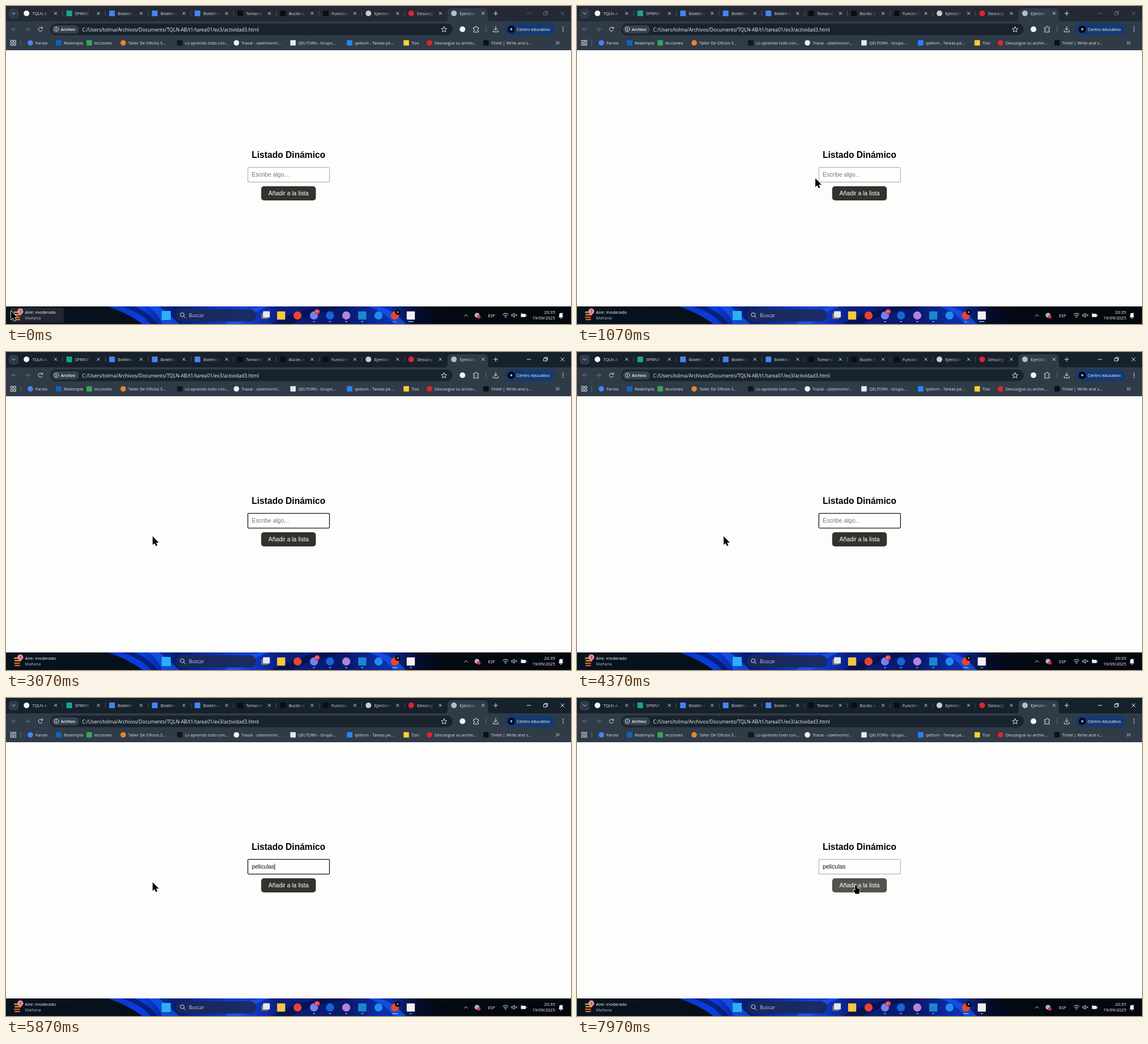
Recreate the animation shown at these times as an HTML page. Size 998 by 561 pixels, loop 8000 ms.

```html
<!DOCTYPE html>
<html lang="es">
<head>
<meta charset="utf-8">
<title>Listado Dinámico</title>
<style>
  html, body { margin: 0; width: 100%; height: 100%; overflow: hidden; background: #fdfdfc; }
  svg { display: block; width: 100vw; height: 100vh; }
  text { font-family: "Open Sans", "Noto Sans", sans-serif; white-space: pre; }
  .page text { font-family: "Liberation Sans", Arial, sans-serif; font-size: 10.4px; }
  .line { fill: none; stroke: #dfe4ea; stroke-width: 1; stroke-linecap: round; stroke-linejoin: round; }
</style>
</head>
<body>
<svg viewBox="0 0 998 561" preserveAspectRatio="none">
  <defs>
    <linearGradient id="fade" gradientUnits="userSpaceOnUse" x1="62" x2="77" y1="0" y2="0">
      <stop offset="0" stop-color="#dfe4ea"/><stop offset="1" stop-color="#dfe4ea" stop-opacity="0"/>
    </linearGradient>
    <linearGradient id="wall" gradientUnits="userSpaceOnUse" x1="180" x2="780" y1="0" y2="0">
      <stop offset="0" stop-color="#0a34c8"/><stop offset=".1" stop-color="#0a3de0"/>
      <stop offset=".2" stop-color="#061c70"/><stop offset=".4" stop-color="#1440e0"/>
      <stop offset=".5" stop-color="#0a1f80"/><stop offset=".7" stop-color="#08196a"/>
      <stop offset=".82" stop-color="#0b2fb0"/><stop offset=".91" stop-color="#050c2c"/>
      <stop offset="1" stop-color="#03060f"/>
    </linearGradient>
    <linearGradient id="bar">
      <stop offset="0" stop-color="#07131f"/><stop offset="1" stop-color="#03070e"/>
    </linearGradient>
  </defs>
  <g id="browser"></g>
  <g class="page">
    <text x="499" y="268.3" text-anchor="middle" font-weight="bold" style="font-size:15.6px">Listado Dinámico</text>
    <rect id="input" x="427.2" y="284.6" width="144.2" height="26" rx="1.5" fill="#fefefd"/>
    <text id="entry" x="434" y="301.4"></text>
    <path id="squiggle" fill="none" stroke="#e0161b" stroke-width=".9"/>
    <rect id="caret" y="292" width=".8" height="11.5" fill="#111"/>
    <rect id="button" x="450.7" y="318" width="96.6" height="25" rx="5"/>
    <text x="499" y="333.5" text-anchor="middle" fill="#fff">Añadir a la lista</text>
  </g>
  <g id="taskbar"></g>
  <g id="pointer" stroke-linejoin="round">
    <path id="arrow" d="M0 0V15.2L3.4 12.2L5.8 17.3L8.4 16.1L6.1 11.2H11Z" stroke="#fff" stroke-width="1.5" paint-order="stroke"/>
    <path id="beam" d="M-2.5 -6Q0 -6 0 -4.5Q0 -6 2.5 -6M0 -4.5V4.5M-2.5 6Q0 6 0 4.5Q0 6 2.5 6" fill="none" stroke="#111"/>
    <path id="hand" d="M-1.7 0Q0 -2.3 1.5 0V4.6L5.6 5.6Q6.8 6 6.6 8L5.3 14.6H-1L-4.8 8.9Q-5 6.7 -1.7 8.5Z" stroke="#fff" stroke-width="1.6" paint-order="stroke"/>
  </g>
</svg>
<script>
const $ = id => document.getElementById(id);

const text = (x, y, value, size = 7.3, fill = '#dfe4ea', extra = '') =>
  `<text x="${x}" y="${y}" font-size="${size}" fill="${fill}" ${extra}>${value}</text>`;
const rect = (x, y, w, h, fill, r = 0, extra = '') =>
  `<rect x="${x}" y="${y}" width="${w}" height="${h}" rx="${r}" fill="${fill}" ${extra}/>`;
const circle = (x, y, r, fill, extra = '') => `<circle cx="${x}" cy="${y}" r="${r}" fill="${fill}" ${extra}/>`;
const line = (d, extra = '') => `<path class="line" d="${d}" ${extra}/>`;
const cross = (x, y, r) => `M${x - r} ${y - r}l${2 * r} ${2 * r}m0 ${-2 * r}l${-2 * r} ${2 * r}`;
const icon = (round, x, y, r, fill) =>
  round ? circle(x, y, r, fill) : rect(x - r, y - r, 2 * r, 2 * r, fill, 1);

const TOOLBAR = '#303b48';

// title, icon colour, round icon
const tabs = [
  ['TQLN-A', '#f2f4f6', 1], ['SPRINT', '#16a394', 0],
  ['Boletín c', '#4285f4', 0], ['Boletín c', '#4285f4', 0], ['Boletín e', '#4285f4', 0],
  ['Tomando', '#0c0e11', 0], ['Bucles e', '#0c0e11', 0], ['Funcione', '#0c0e11', 0],
  ['Ejercicio', '#c9ced4', 1], ['Descarga', '#e3242b', 1], ['Ejercicio', '#b5bdc7', 1],
];

// icon x, title, icon colour, round icon
const bookmarks = [
  [43, 'Farola', '#4285f4', 1], [93, 'Redempla', '#0a66c2', 0], [147, 'lecciones', '#35a853', 0],
  [207, 'Taller De Oficios S...', '#e8842c', 1], [307, 'Lo aprendo todo con...', '#14171b', 0],
  [407, 'Trazal - ubelmorin/...', '#f2f4f6', 1], [507, 'QELTORN - Grupo...', '#e4e8f4', 0],
  [607, 'qeltorn - Tareas pe...', '#2684ff', 0], [707, 'Tizo', '#ffd02f', 0],
  [748, 'Descargue su archiv...', '#e3242b', 1], [848, 'Tintel | Write and s...', '#101010', 0],
];

function drawBrowser() {
  const tabMarkup = tabs.map(([title, color, round], i) =>
    `<g transform="translate(${75.5 * i})">` +
    icon(round, 36.2, 13, 5, color) + text(46.5, 16, title, 7.3, 'url(#fade)') +
    line(cross(87.7, 13, 2.2)) + (i < 9 ? line('M100 9v8', 'opacity=".25"') : '') + '</g>').join('');

  const bookmarkMarkup = bookmarks.map(([x, title, color, round]) =>
    icon(round, x, 65, 4.8, color) + text(x + 9, 67.5, title)).join('');

  const appGrid = [8.5, 14].map(x => [60.5, 66].map(y =>
    rect(x, y, 3.4, 3.4, 'none', 0, 'class="line"')).join('')).join('');

  $('browser').innerHTML =
    rect(0, 0, 998, 28, '#17212c', 0, 'id="strip"') +
    rect(0, 27, 998, 51, TOOLBAR) +
    `<path d="M774 28Q780 28 780 21V11Q780 4 787 4H844Q851 4 851 11V21Q851 28 857 28Z" fill="${TOOLBAR}"/>` +
    rect(5, 5, 17, 17, '#303b48', 5) + line('M11 12l2.5 2.5l2.5 -2.5') +
    tabMarkup + line('M861.5 13h7M865 9.5v7') +
    `<g id="windowButtons">${line('M920.5 13h6.5')}${line('M950 11h5v5h-5zM951.5 11v-1.5h5v5H955', 'stroke-width=".8"')}${line(cross(983, 13, 3))}</g>` +
    line('M18 41h-7.5m3.5 -3.5l-3.5 3.5l3.5 3.5M34 41h7.5m-3.5 -3.5l3.5 3.5l-3.5 3.5', 'opacity=".35"') +
    line('M64.2 42.5A3.6 3.6 0 1 1 63.6 38.5M64.5 37v2.4h-2.4') +
    rect(78, 31, 711, 20.5, '#19232e', 10.2) + rect(81, 34, 48, 14.5, '#35414f', 7.2) +
    circle(89, 41, 3.7, 'none', 'class="line"') + line('M89 40.7v2M89 39v.1') +
    text(97, 43.8, 'Archivo', 7, '#fff', 'font-weight="600"') +
    text(134.5, 44.5, 'C:/Users/tolma/Archivos/Documents/TQLN-AB/t1/tarea01/ex3/actividad3.html', 8.6, '#f0f3f6') +
    line('M773.8 36.5l1.4 3.2l3.5 .3l-2.7 2.3l.9 3.4l-3.1 -1.9l-3.1 1.9l.9 -3.4l-2.7 -2.3l3.5 -.3z') +
    circle(806.3, 41, 5, '#f4f5f6') +
    line('M826 38h3q0 -2.4 1.6 -2.4t1.6 2.4h2.3v3q-2 0 -2 1.4t2 1.4v2.2h-8.5v-2.4q2 -.2 2 -1.4t-2 -1.4z') +
    line('M848 36v10', 'opacity=".3"') +
    line('M865 36v6.5m-2.7 -2.6l2.7 2.6l2.7 -2.6M860.7 43v2.7h8.6V43') +
    rect(880.3, 30.5, 89.2, 21, '#153a70', 10.5) + circle(892.5, 41, 6.6, '#080b14') +
    circle(892.5, 41, 2, '#9fb2dd') + text(902, 43.8, 'Centro educativo', 7.4, '#fff') +
    [37.5, 41, 44.5].map(y => circle(984, y, .9, '#dfe4ea')).join('') +
    appGrid + line('M26 60v10', 'opacity=".3"') + bookmarkMarkup +
    line('M971.5 62.5l2.5 2.5l-2.5 2.5M975 62.5l2.5 2.5l-2.5 2.5');
}

// icon x, colour, round icon, running
const apps = [
  [486, '#f8c640', 0], [515, '#ea4335', 1], [544, '#7480f0', 1, 1], [572.3, '#1764d8', 1, 1],
  [601, '#b583d9', 1, 1], [629.3, '#1b86cf', 0, 1], [658, '#1d8ef0', 1],
  [687, '#ea4335', 1], [715, '#f3eef0', 0],
];

function drawTaskbar() {
  const appMarkup = apps.map(([x, color, round, running]) =>
    icon(round, x, 546, 7.2, color) + (running ? rect(x - 2, 556, 4, 1.4, '#a5abb7', .7) : '')).join('');

  $('taskbar').innerHTML =
    rect(0, 530, 998, 31, 'url(#bar)') +
    '<path d="M180 530H738Q762 542 778 561H241Q216 542 180 530Z" fill="url(#wall)"/>' +
    '<path d="M252 530Q270 544 276 561H306Q284 540 270 530ZM388 561Q410 538 448 530H464Q432 541 414 561ZM640 530Q672 541 684 561H706Q690 540 660 530Z" fill="#1c62ff" opacity=".6"/>' +
    '<path d="M205 530Q240 542 256 561H268Q252 541 228 530ZM470 561Q500 540 560 530H610Q540 540 505 561Z" fill="#020b35" opacity=".55"/>' +
    rect(8, 532, 94, 26.5, '#202733', 3, 'id="widgetHover"') +
    [539, 543.5, 548, 552].map((y, i) => rect(14 + i % 2, y, 13 - i, 2.2, i < 2 ? '#f4a13a' : '#e2612c', 1)).join('') +
    circle(25.3, 538.7, 5.1, '#f5929d') + text(25.3, 541.3, '3', 7, '#2b1013', 'text-anchor="middle"') +
    text(33.5, 542.7, 'Aire: moderado', 7.55, '#fff') + text(33.5, 553, 'Mañana', 7.4, '#b4bac4') +
    rect(275, 538, 16, 16, '#2cb0f4', 1) +
    rect(300, 535, 142, 21.5, '#1b2a5a', 10.7, 'opacity=".92"') +
    circle(311.3, 544.7, 3.4, 'none', 'class="line"') + line('M313.8 547.3l3 3') +
    text(323, 549, 'Buscar', 8.5, '#c6cddc') +
    rect(451, 542, 12, 10, '#6c7078', 1) + rect(454, 538.5, 12, 11, '#e4e6ea', 1) +
    appMarkup +
    rect(544.8, 534.8, 9.6, 9, '#d9364a', 4.5) + text(549.6, 541.4, '9+', 5.6, '#fff', 'text-anchor="middle"') +
    circle(692, 540, 5, '#090c16') + circle(692, 540, 1.5, '#9fb2dd') +
    '<rect id="browserMark" y="556" height="1.5" rx=".7"/><rect id="captureMark" y="556" height="1.5" rx=".7"/>' +
    line('M809.5 547.3l3 -3l3 3') + circle(832, 545.5, 4.3, '#aeb4bd') + circle(835.3, 548.5, 3, '#d92f3c') +
    text(851.5, 548.7, 'ESP', 7.2, '#fff') +
    line('M877.5 544q4.8 -4.2 9.6 0M879.3 546.2q3 -2.6 6 0M881 548.3q1.3 -1.1 2.6 0M882.3 549.5v.1') +
    line('M893.5 544.3h1.8l2.6 -2.4v7.4l-2.6 -2.4h-1.8zM899.8 544l3 3m0 -3l-3 3', 'stroke-width=".8"') +
    rect(909.5, 543, 8.5, 5.8, '#eef1f4', 1) + line('M919.2 545v2M910 541.5l2 2') +
    text(970, 542.7, '20:35', 7.6, '#fff', 'text-anchor="end"') +
    text(970, 553, '19/09/2025', 7.6, '#fff', 'text-anchor="end"') +
    '<path d="M976 549.2l1.1 -1.8v-3q.3 -2.9 3.1 -2.9t3.1 2.9v3l1.1 1.8zM978.7 550h3q-.4 1.5 -1.5 1.5t-1.5 -1.5" fill="#f1f3f6"/>' +
    text(982, 543.5, 'z', 5, '#fff');
}

const LOOP = 8000, FOCUS = 1330, BLUR = 7920, TYPE_START = 4720, TYPE_END = 5700, BLINK = 530;
const WORD = 'peliculas', WORD_WIDTH = 41;

// time, x, y
const pointerPath = [
  [0, 9, 538], [330, 9, 538], [1070, 421, 304], [1230, 452, 299], [1400, 452, 299],
  [1820, 259, 325], [6800, 259, 325], [7170, 275, 317], [7780, 493, 331], [LOOP, 493, 331],
];

function pointerAt(t) {
  const next = pointerPath.findIndex(key => key[0] > t);
  const [t0, x0, y0] = pointerPath[next - 1], [t1, x1, y1] = pointerPath[next];
  const p = (t - t0) / (t1 - t0), eased = p * p * (3 - 2 * p);
  return [x0 + (x1 - x0) * eased, y0 + (y1 - y0) * eased];
}

const inside = (x, y, left, top, right, bottom) => x >= left && x <= right && y >= top && y <= bottom;
const show = (id, visible) => $(id).setAttribute('visibility', visible ? 'visible' : 'hidden');
const set = (id, attributes) => {
  for (const name in attributes) $(id).setAttribute(name, attributes[name]);
};
const mark = (id, x, active) => {
  const width = active ? 10 : 4;
  set(id, { x: x - width / 2, width, fill: active ? '#62c6ff' : '#a5abb7' });
};

function render(t) {
  const [x, y] = pointerAt(t);
  const windowActive = t >= FOCUS;
  const focused = windowActive && t < BLUR;
  const overInput = inside(x, y, 427, 284, 572, 311);
  const overButton = inside(x, y, 451, 318, 547, 343);

  set('pointer', { transform: `translate(${x} ${y})` });
  show('arrow', !overInput && !overButton);
  show('beam', overInput);
  show('hand', overButton);
  show('widgetHover', inside(x, y, 8, 532, 102, 559));

  set('strip', { fill: windowActive ? '#17212c' : '#232a35' });
  set('windowButtons', { opacity: windowActive ? 1 : .35 });
  mark('browserMark', 687, windowActive);
  mark('captureMark', 715, !windowActive);

  set('input', focused
    ? { stroke: '#151515', 'stroke-width': 1.3 }
    : { stroke: '#7d7d78', 'stroke-width': .7 });
  set('button', { fill: overButton ? '#53534d' : '#32322e' });

  const typing = (t - TYPE_START) / (TYPE_END - TYPE_START);
  const count = t < TYPE_START ? 0 : Math.min(WORD.length, 1 + Math.floor(typing * (WORD.length - 1)));
  const entry = $('entry');
  entry.textContent = WORD.slice(0, count) || 'Escribe algo...';
  entry.setAttribute('fill', count ? '#111' : '#757575');

  const keyTime = count === WORD.length ? TYPE_END : FOCUS;
  const typingNow = count > 0 && count < WORD.length;
  show('caret', focused && (typingNow || Math.floor((t - keyTime) / BLINK) % 2 === 0));
  set('caret', { x: 434 + (count ? entry.getComputedTextLength() : 0) });
  show('squiggle', focused && t > 6300);
}

drawBrowser();
drawTaskbar();
set('squiggle', { d: 'M434 303.6' + 'l1 -1.4l1 1.4'.repeat(WORD_WIDTH / 2) });

function tick() {
  render(performance.now() % LOOP);
  requestAnimationFrame(tick);
}
tick();
</script>
</body>
</html>
```
